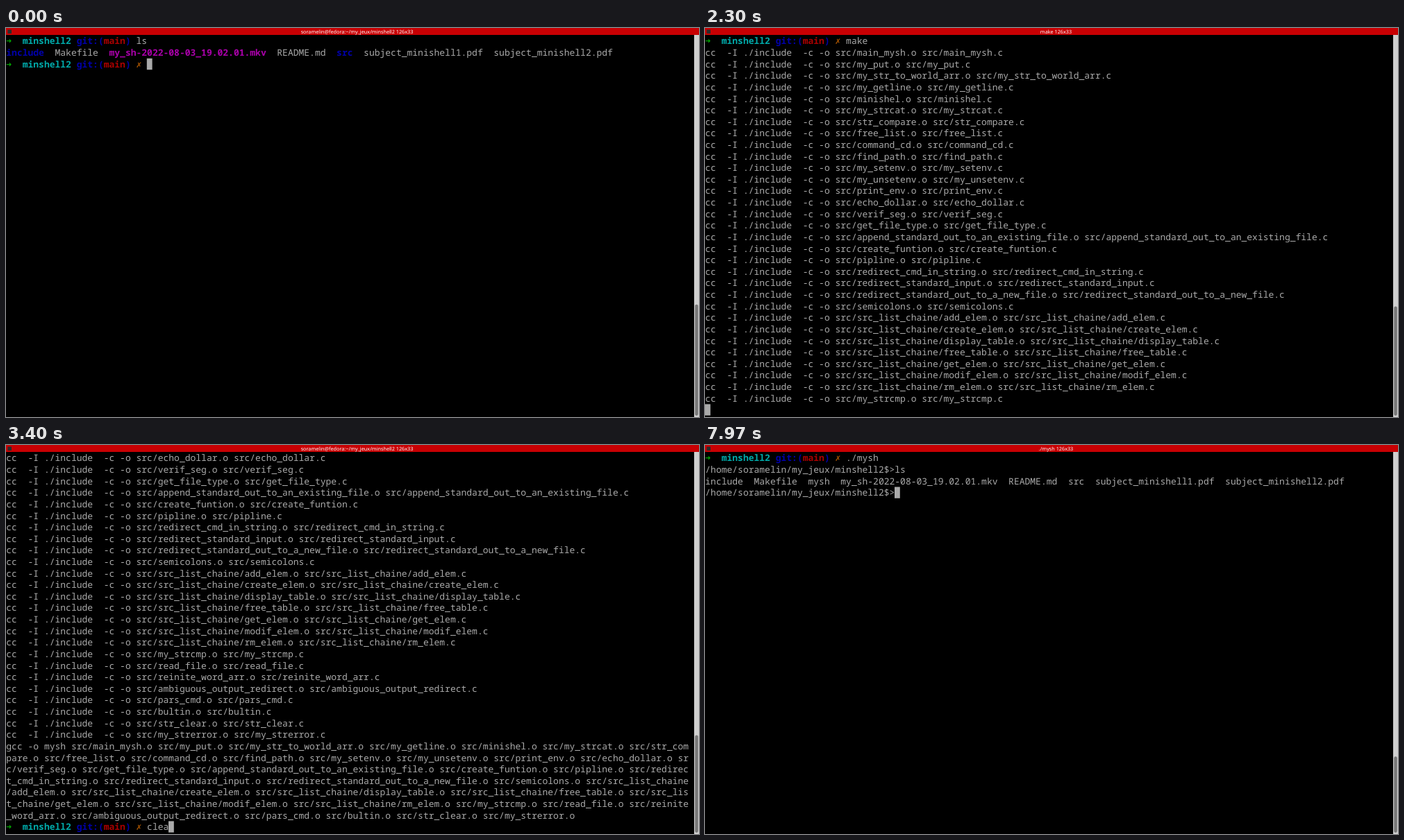
Write an HTML page that moves like this. It is 998 by 561 pixels and loops after 8 s.

```html
<!DOCTYPE html>
<html lang="en">
<head>
<meta charset="utf-8">
<title>Terminal session</title>
<style>
  html, body { margin: 0; width: 100%; height: 100%; overflow: hidden; background: #000; }
  svg { display: block; width: 100vw; height: 100vh; }
  text { white-space: pre; text-rendering: geometricPrecision; }
  #screen { font: 13px "Noto Sans Mono", "DejaVu Sans Mono", monospace; font-variant-ligatures: none; }
  #title { font: 7.25px "Noto Sans", "Open Sans", sans-serif; fill: #fff; text-anchor: middle; }
</style>
</head>
<body>
<svg viewBox="0 0 998 561">
  <rect width="998" height="561"/>
  <g id="screen"></g>
  <rect id="cursor" width="7.8" height="16.3" fill="#aaa"/>
  <rect x="991" y="10" width="7" height="551" fill="#cfcfcf"/>
  <rect id="thumb" x="992.2" width="4.6" rx="2.2" fill="#777"/>
  <rect width="998" height="10" fill="#c80003"/>
  <rect x="2.5" y="2.5" width="5.5" height="5.5" fill="#2b2b2b"/>
  <text id="title" x="505.5" y="7.7"></text>
</svg>
<script>
const LOOP = 8000, COLS = 126, ROWS = 33, CELL = 7.8, LINE = 16.62, TOP = 10.6;
const BLINK = 600, HISTORY = 113, HISTORY_CLEARED = 165;
const GREY = '#aaa', BLUE = '#00a', CYAN = '#0aa', RED = '#a00',
      GREEN = '#0a0', PURPLE = '#a0a', BROWN = '#a50';

const $ = id => document.getElementById(id);
const user = 'soramelin';
const shellTitle = `${user}@fedora:~/my_jeux/minshell2`;
const innerPrompt = `/home/${user}/my_jeux/minshell2$>`;

// A line is a list of [column, text, colour, bold].
const plain = s => [[0, s, GREY, false]];
const prompt = cmd => [
  [0, '➜', GREEN, true], [3, 'minshell2', CYAN, true], [13, 'git:(', BLUE, true],
  [18, 'main', RED, true], [22, ')', BLUE, true], [24, '✗', BROWN, true], [26, cmd, GREY, false]
];

const movie = 'my_sh-2022-08-03_19.02.01.mkv';
const pdfs = 'subject_minishell1.pdf  subject_minishell2.pdf';
const listing = [
  [0, 'include', BLUE, true], [9, 'Makefile', GREY, false], [19, movie, PURPLE, true],
  [50, 'README.md', GREY, false], [61, 'src', BLUE, true], [66, pdfs, GREY, false]
];
const firstPrompt = prompt('ls').filter(p => p[1] !== '✗')
  .map(p => p[1] === 'ls' ? [24, 'ls', GREY, false] : p);

const chain = 'add_elem create_elem display_table free_table get_elem modif_elem rm_elem'
  .split(' ').map(n => 'src_list_chaine/' + n);
const units = [
  ...('main_mysh my_put my_str_to_world_arr my_getline minishel my_strcat str_compare free_list ' +
    'command_cd find_path my_setenv my_unsetenv print_env echo_dollar verif_seg get_file_type ' +
    'append_standard_out_to_an_existing_file create_funtion pipline redirect_cmd_in_string ' +
    'redirect_standard_input redirect_standard_out_to_a_new_file semicolons').split(' '),
  ...chain,
  ...('my_strcmp read_file reinite_word_arr ambiguous_output_redirect pars_cmd bultin ' +
    'str_clear my_strerror').split(' ')
].map(n => 'src/' + n);
const compile = units.map(u => plain(`cc  -I ./include  -c -o ${u}.o ${u}.c`));
const link = ('gcc -o mysh ' + units.map(u => u + '.o').join(' '))
  .match(new RegExp(`.{1,${COLS}}`, 'g')).map(plain);

// Keyboard input: text, first key, delay between keys, Enter.
const input = (text, start, step, enter) => ({ text, start, step, enter });
const make = input('make', 400, 120, 950);
const clear = input('clear', 3000, 130, 3750);
const mysh = input('./mysh', 4600, 200, 6000);
const ls = input('ls', 6800, 190, 7400);
const keys = [make, clear, mysh, ls].flatMap(c =>
  [...[...c.text].map((_, i) => c.start + i * c.step), c.enter]);

const typed = (c, t) => c.text.slice(0, Math.max(0, Math.floor((t - c.start) / c.step) + 1));
const FIRST_CC = 1010, CC_STEP = 43, LINKED = 2690;

function session(t) {
  let lines, col = 0, title = shellTitle, history = HISTORY;
  const ask = (c, head, at) => {
    const s = typed(c, t);
    lines.push(head(s));
    col = at + s.length;
  };
  if (t < clear.enter) {
    lines = [firstPrompt, listing];
    ask(make, prompt, 26);
    if (t >= make.enter) {
      const done = Math.max(0, Math.floor((t - FIRST_CC) / CC_STEP) + 1);
      lines.push(...compile.slice(0, done));
      if (done > units.length) lines.push(...link);
      if (t >= LINKED) ask(clear, prompt, 26);
      else {
        title = 'make';
        lines.push([]);
        col = 0;
      }
    }
  } else {
    lines = [];
    history = HISTORY_CLEARED;
    ask(mysh, prompt, 26);
    if (t >= mysh.enter) {
      title = './mysh';
      ask(ls, s => plain(innerPrompt + s), innerPrompt.length);
      if (t >= ls.enter) {
        lines.push(plain(`include  Makefile  mysh  ${movie}  README.md  src  ${pdfs}`), plain(innerPrompt));
        col = innerPrompt.length;
      }
    }
  }
  const scroll = Math.max(0, lines.length - ROWS);
  return { lines: lines.slice(scroll), col, title, total: history + scroll };
}

function set(el, attrs) {
  for (const k in attrs) el.setAttribute(k, attrs[k]);
}

function drawLine(parts, row) {
  for (const [col, s, fill, bold] of parts) {
    const el = document.createElementNS('http://www.w3.org/2000/svg', 'text');
    set(el, {
      x: 0.3 + col * CELL, y: TOP + row * LINE + 12.8, fill,
      'font-weight': bold ? 700 : 400
    });
    el.textContent = s;
    $('screen').append(el);
  }
}

let shown = '';
function render(t) {
  const { lines, col, title, total } = session(t);
  const lastKey = Math.max(0, ...keys.filter(k => k <= t));
  const lit = Math.floor((t - lastKey) / BLINK) % 2 === 0;
  set($('cursor'), {
    x: col * CELL, y: TOP + (lines.length - 1) * LINE,
    visibility: lit ? 'visible' : 'hidden'
  });

  const state = [lines.length, col, title, total].join();
  if (state === shown) return;
  shown = state;
  $('screen').replaceChildren();
  lines.forEach(drawLine);
  $('title').textContent = `${title} ${COLS}x${ROWS}`;
  const size = 549 * ROWS / total;
  set($('thumb'), { y: 559 - size, height: size });
}

const begin = performance.now();
function tick() {
  render((performance.now() - begin) % LOOP);
  requestAnimationFrame(tick);
}
tick();
</script>
</body>
</html>
```
